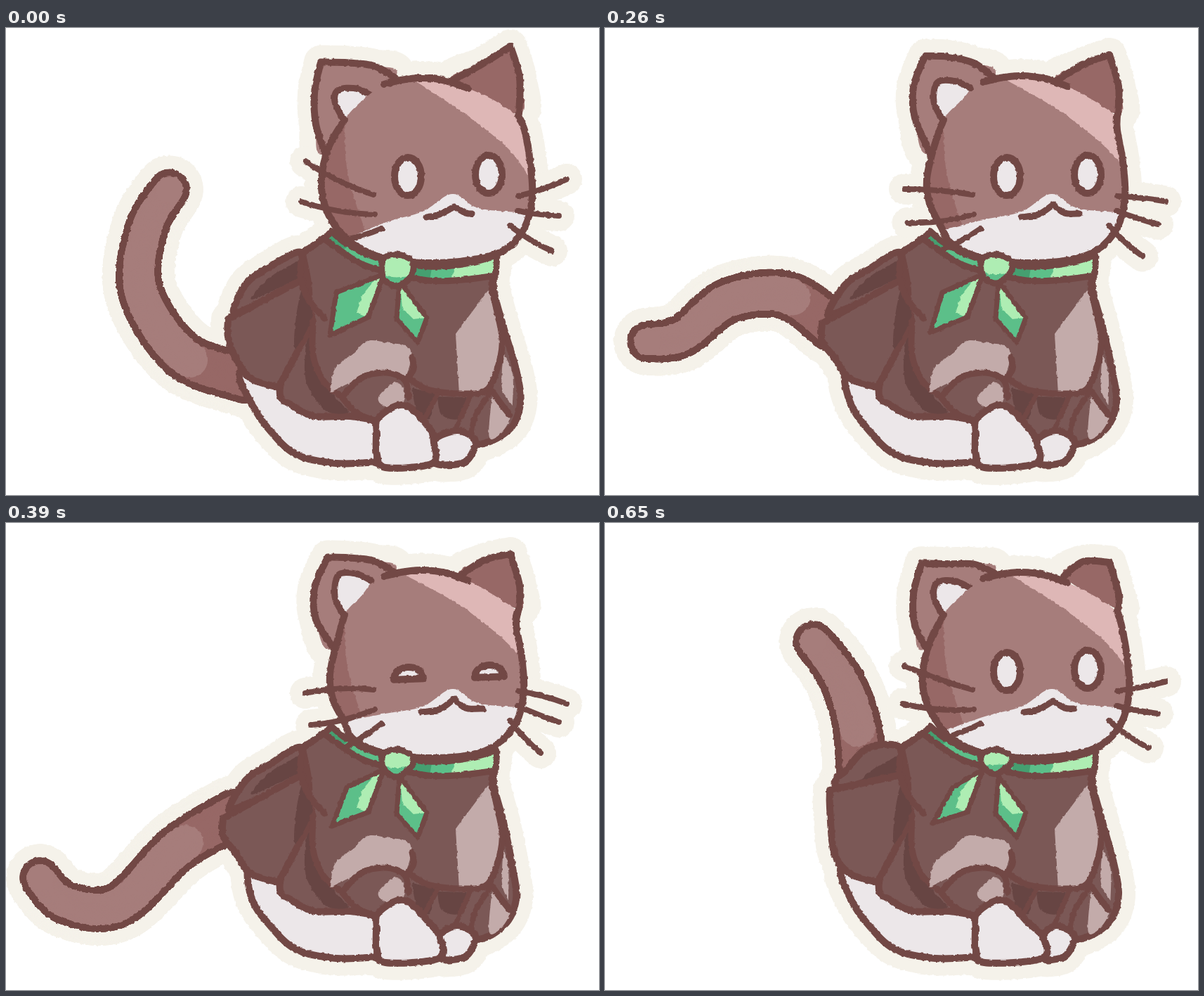
Write an HTML page with a canvas that moves like this. It is 844 by 664 pixels and loops after 0.78 s.

```html
<!DOCTYPE html>
<html>
<head>
<meta charset="utf-8">
<title>Cat wagging its tail</title>
<style>
html, body { margin: 0; width: 100%; height: 100%; overflow: hidden; background: #fff; }
canvas { display: block; filter: url(#rough); }
svg { position: absolute; }
</style>
</head>
<body>
<svg width="0" height="0">
  <filter id="rough" x="0" y="0" width="1" height="1" color-interpolation-filters="sRGB">
    <feTurbulence type="fractalNoise" baseFrequency=".2" result="noise"/>
    <feDisplacementMap in="SourceGraphic" in2="noise" scale="4" xChannelSelector="R" yChannelSelector="G"/>
  </filter>
</svg>
<canvas width="844" height="664"></canvas>
<script>
const ctx = document.querySelector('canvas').getContext('2d');
const HOLD = 130, STEPS = 6, BLINK = 3;
const LINE = '#724845', FUR = '#a67d7b', SHADE = '#976866', PINK = '#deb7b6', WHITE = '#ece7e9',
  CAPE = '#7b5856', FOLD = '#674543', LIGHT = '#c3abaa', HALO = '#f5f2ea',
  GREEN = '#5cbf89', DEEP = '#459f70', MINT = '#aeedb3';

// Tail spine from base to tip, and the hip corner, at each step.
const poses = [
  { tail: '340,497 252,465 192,375 200,285 233,229', hip: [316, 414] },
  { tail: '335,495 235,464 140,450 115,380 142,303', hip: [301, 403] },
  { tail: '325,425 258,380 175,388 110,438 60,446', hip: [309, 420] },
  { tail: '325,415 245,462 160,543 85,540 48,504', hip: [309, 420] },
  { tail: '350,355 290,303 212,281 160,291 116,312', hip: [306, 398] },
  { tail: '366,350 358,285 342,235 322,200 296,168', hip: [320, 380] }
];

// Smooth curve through "x,y" points; "!" marks a corner.
function curve(text, closed = true) {
  const pts = [];
  for (const word of text.trim().split(/\s+/)) {
    const p = word.split(',').map(parseFloat);
    pts.push(p);
    if (word.endsWith('!')) pts.push(p);
  }
  const n = pts.length, path = new Path2D();
  const at = i => closed ? pts[(i + n) % n] : pts[Math.max(0, Math.min(n - 1, i))];
  path.moveTo(...pts[0]);
  for (let i = 0; i < (closed ? n : n - 1); i++) {
    const [a, b, c, d] = [at(i - 1), at(i), at(i + 1), at(i + 2)];
    if (b === c) continue;
    path.bezierCurveTo(b[0] + (c[0] - a[0]) / 6, b[1] + (c[1] - a[1]) / 6,
      c[0] - (d[0] - b[0]) / 6, c[1] - (d[1] - b[1]) / 6, ...c);
  }
  if (closed) path.closePath();
  return path;
}
function ink(path, width = 10, color = LINE) {
  ctx.lineWidth = width;
  ctx.strokeStyle = color;
  ctx.stroke(path);
}
function fill(path, color) {
  ctx.fillStyle = color;
  ctx.fill(path);
}
function shape(path, color, width) {
  fill(path, color);
  ink(path, width);
}
const blot = (text, color) => fill(curve(text), color);
const line = (text, width) => ink(curve(text, false), width);
function inside(path, draw) {
  ctx.save();
  ctx.clip(path);
  draw();
  ctx.restore();
}

// A tapering row of discs along the spine, from share u of its length to the tip.
function tube(spine, grow, color, u = 0) {
  const pts = spine.split(' ').map(w => w.split(',').map(Number)), last = pts.length - 1;
  const at = i => pts[Math.max(0, Math.min(last, i))];
  ctx.fillStyle = color;
  for (; u <= 1; u += .004) {
    const i = Math.min(last - 1, Math.floor(u * last)), t = u * last - i;
    const [x, y] = [0, 1].map(k => {
      const [a, b, c, d] = [-1, 0, 1, 2].map(j => at(i + j)[k]);
      return b + t / 2 * (c - a + t * (2 * a - 5 * b + 4 * c - d + t * (3 * (b - c) + d - a)));
    });
    ctx.beginPath();
    ctx.arc(x, y, 32 - 8 * u + grow, 0, 7);
    ctx.fill();
  }
}

function whisker(x, y, tipX, tipY, sag) {
  const path = new Path2D();
  path.moveTo(x, y);
  path.quadraticCurveTo((x + tipX) / 2, (y + tipY) / 2 + sag, tipX, tipY);
  return path;
}

function drawCape(back, body, flap, side) {
  shape(back, CAPE);
  blot('418,330! 420,354! 350,386 375,355', FOLD);
  shape(body, CAPE);
  blot('432,440 440,485 470,527 488,546 455,544 428,505 426,460', FOLD);
  shape(flap, CAPE);
  blot('424,364 432,395 436,412 412,455 413,410', FOLD);
  line('422,320 419,352 430,385 453,413', 9);
  line('437,418 437,465 452,502 478,525', 9);

  // Chest and the folds under it
  blot('462,518! 468,485 495,462 514,445 540,447 572,453 576,472 569,497! 540,492 505,498', LIGHT);
  blot('578,512! 612,520! 603,555 585,545', FOLD);
  blot('614,524! 656,525! 645,555 620,550', FOLD);
  blot('692,520! 716,548 708,572 688,582', LIGHT);
  blot(`708,462! ${side - 11},492 ${side - 11},537! 706,512`, LIGHT);
  blot('690,368! 640,435! 645,519! 675,517 697,490 704,440', LIGHT);
  line('572,497 600,514 650,520 685,514 702,475 706,440 697,395 691,365 696,330', 9);
  line('690,514 705,535 717,550', 9);
  line('614,522 592,562', 7);
  line('660,525 640,570', 7);
  line('690,517 668,552 662,580', 8);

  // Bent front leg
  blot('480,522 505,498 540,490 567,502 572,540 531,560 500,548', CAPE);
  blot('530,525 553,504 566,514 565,532 540,538', LIGHT);
  line('573,525 567,500 540,490 505,498 478,525! 500,548 531,560', 9);
  line('578,468 580,485 570,500', 9);
}

function drawScarf(step) {
  const left = curve(`538,350! ${470 + 5 * step},376! ${461 + step},${437 - 2 * step}! 516,411!`);
  const right = curve('560,360! 556,414! 586,447! 599,412!');
  for (const [bow, glow] of [
    [left, '540,340! 507,380! 499,405! 515,412! 550,370!'],
    [right, '560,350! 564,398! 580,414! 600,412! 600,390!']
  ]) {
    fill(bow, GREEN);
    inside(bow, () => blot(glow, MINT));
    ink(bow, 7);
  }
  const band = curve('463,289! 482,305 510,320 540,330 600,339 650,336 699,324! 697,352! 650,358 600,359 535,345 505,335 478,318 453,300!');
  fill(band, GREEN);
  inside(band, () => {
    blot('450,280! 468,290! 484,312! 474,322! 448,302!', DEEP);
    blot('580,330! 608,330! 602,365! 580,365!', DEEP);
    blot('642,330! 702,320! 700,360! 632,362!', MINT);
  });
  ink(band, 9);
  const low = 367 - 2 * step;
  const knot = curve(`537,329 556,322 578,331 577,${low - 15} 556,${low} 537,${low - 12}`);
  fill(knot, MINT);
  inside(knot, () => blot(`530,345! 550,${low - 13} 575,${low - 14}! 560,${low + 5}!`, GREEN));
  ink(knot, 9);
}

function drawFace(step, swing, head, outline, brow) {
  const start = 576 + 6 * swing, cheek = 295 + 11 * swing;
  fill(head, FUR);
  inside(head, () => {
    blot('483,120! 483,180 492,230 515,300! 430,300! 430,120!', SHADE);
    blot(`${start},60! ${start},75! 640,113 690,150 720,177 745,${208 + 4 * swing}! 780,150! 700,60!`, PINK);
    blot(`470,${cheek}! 540,${200 + cheek / 4} 593,261 635,236 672,256 735,263 770,270! 760,350! 470,350!`, WHITE);
  });
  line(outline);
  line(brow);
  for (const [x, y] of [[572, 211], [687, 208]]) {
    const eye = new Path2D();
    if (step === BLINK) {
      eye.ellipse(x + 1, y + 11, 21, 17, -.04, Math.PI, 0);
      eye.closePath();
    } else eye.ellipse(x, y, 19, 27, 0, 0, 7);
    shape(eye, WHITE);
  }
  line(`${594 + 4 * swing},269 617,265 638,${252 + 2 * swing}! 654,263 ${671 - 8 * swing},264`, 9);
}

function draw(step) {
  const { tail, hip: [x, y] } = poses[step];
  const swing = Math.cos(2 * Math.PI * step / STEPS), sway = Math.sin(2 * Math.PI * step / STEPS);
  const L = 455 - 6 * swing, R = 743 + 6 * swing, T = 69 + 2 * swing, side = 729 + 3 * swing;

  const outline = `482,130 ${L + 10},170 ${L},215 ${L + 4},250 ${L + 20},282 495,308 540,328 600,334 660,330
    ${R - 40},316 ${R - 11},284 ${R},240 ${R - 3},190 ${R - 11},145 729,125`;
  const brow = `538,${T + 9} 562,${T + 3} 592,${T} 626,${T + 4} 658,${T + 15}`;
  const head = curve(`${outline}! 695,103 658,${T + 15} 626,${T + 4} 592,${T} 562,${T + 3} 538,${T + 9} 505,105`);

  // Ears sink in turn as the tail comes round
  const earY = 48.5 - 10 * sway, tipY = 26 + 6 * step, innerY = 81 + 7 * swing;
  const ears = [
    `${L + 5},178 441,${earY + 88} 439,${earY + 44} ${453 - 5 * swing},${earY}! 488,${earY + 1} 525,${30 + earY / 2} 554,71`,
    `${633 + 4 * step},76 680,${50 + step} 718,${tipY}! 731,${tipY + 45} 730,122`
  ];
  const inner = `480,130 468,105 473,${innerY} 498,${innerY - 2} 520,${innerY + 8}`;

  const back = curve(`420,319 374,${92 + y * .6} 342,${239 + y * .3} ${x + 8},${y - 14} 330,405! 425,362!`);
  const flap = curve(`${x},${y}! ${x},${y + 25} 326,468 348,498 388,511! 437,418! 421,358!`);
  const haunch = curve(`${338 - 6 * swing},492 350,535 372,568 412,606 470,619 528,617! 530,550! 470,520! 360,470!`);
  const body = curve(`455,297! 422,320! 430,400 390,511 410,538 440,552 490,552 530,560 580,580 665,593
    ${side - 17},572 ${side},535 ${side - 5},490 708,425 694,370 697,328! 600,345 530,335`);
  const toe = 609 + 3 * step, paws = [
    curve(`${toe},586 643,573 668,587 657,614 635,621 ${toe},617`),
    curve(`530,554 567,536 602,568 ${toe},590 ${toe - 2},619 540,625 528,607 527,580`)
  ];

  const whiskers = [
    whisker(523, 237, 426, 216 - 26 * swing, 8 * swing),
    whisker(525, 265, 427 - 7 * swing, 267 - 20 * swing, 8),
    whisker(535, 285, 483, 310 - 9 * swing, 3),
    whisker(729, 239, 798, 236 - 21 * swing, 4 * swing),
    whisker(728, 260, 787, 275 - 8 * swing, 2),
    whisker(717, 281, 769 + 8 * swing, 322 - 5 * swing, 5)
  ];

  ctx.fillStyle = '#fff';
  ctx.fillRect(0, 0, 844, 664);
  tube(tail, 24, HALO);
  for (const part of [haunch, back, flap, body, head, ...paws, ...ears.map(e => curve(e))]) {
    fill(part, HALO);
    ink(part, 48, HALO);
  }
  whiskers.forEach(w => ink(w, 44, HALO));

  tube(tail, 5, LINE);
  tube(tail, -5, SHADE);
  tube(tail, -5, FUR, .22);
  shape(haunch, WHITE);
  drawCape(back, body, flap, side);
  paws.forEach(paw => shape(paw, WHITE));
  ears.forEach((ear, i) => {
    blot(ear, i ? SHADE : FUR);
    line(ear);
  });
  blot(inner, WHITE);
  line(inner, 9);
  drawFace(step, swing, head, outline, brow);
  drawScarf(step);
  whiskers.forEach(w => ink(w, 8));
}

ctx.lineCap = ctx.lineJoin = 'round';
let shown = -1;
function tick(now) {
  const step = Math.floor(now / HOLD) % STEPS;
  if (step !== shown) draw(shown = step);
  requestAnimationFrame(tick);
}
requestAnimationFrame(tick);
</script>
</body>
</html>
```
